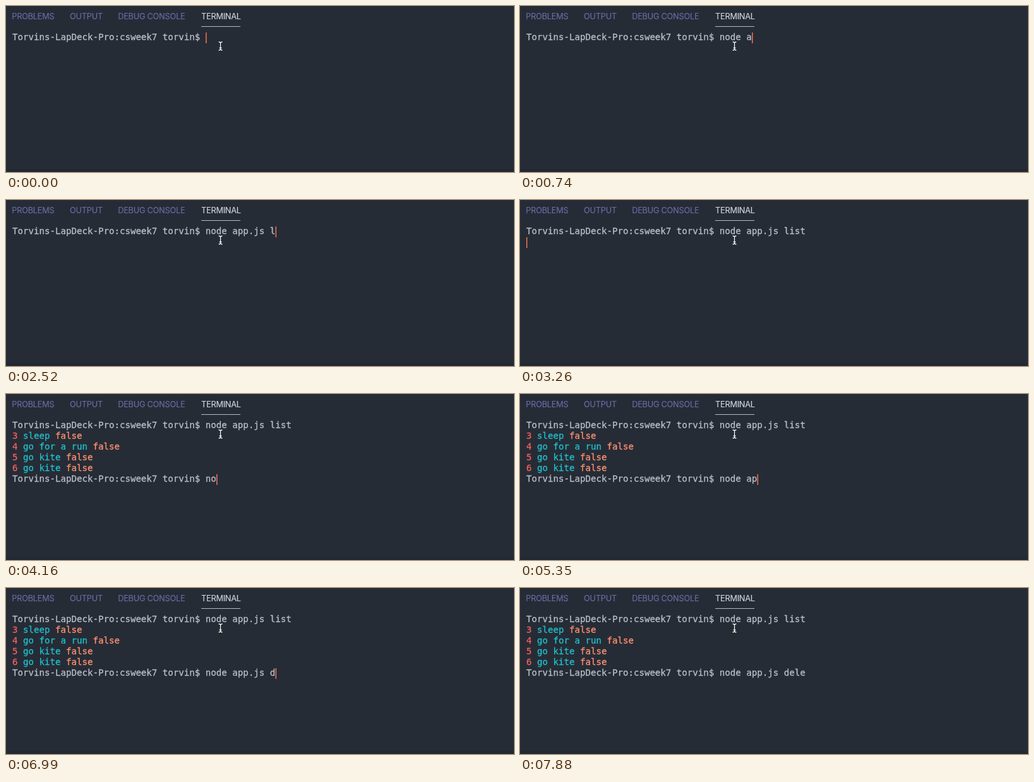
These frames come from a looping animation (804x263 px, 8 s). An HTML page:

```html
<!DOCTYPE html>
<html lang="en">
<head>
<meta charset="utf-8">
<title>Terminal</title>
<style>
  html, body { margin: 0; height: 100%; overflow: hidden; background: #262c36; }
  svg { display: block; width: 804px; height: 263px; }
  text { white-space: pre; stroke-width: .3px; }
  #tabs { font: 12.7px Inter, sans-serif; letter-spacing: -.2px; fill: #6b6aa3; stroke: #6b6aa3; }
  #tabs text { stroke-width: .15px; }
  #tabs .active { fill: #d0d4dc; stroke: #d0d4dc; }
  #lines { font: 14.12px "DejaVu Sans Mono", monospace; fill: #b9bec8; stroke: #b9bec8; }
  .id { fill: #f4605c; stroke: #f4605c; }
  .task { fill: #1fc0cb; stroke: #1fc0cb; }
  .done { fill: #ff9170; stroke: #ff9170; }
</style>
</head>
<body>
<svg viewBox="0 0 804 263">
  <defs>
    <path id="beam" d="M337 57q2.5 0 2.5 2v9q0 2-2.5 2M342 57q-2.5 0-2.5 2M339.5 68q0 2 2.5 2M338 66.5h3"/>
  </defs>
  <rect y="258" width="804" height="5" fill="#232932"/>
  <g id="tabs">
    <text x="9.3" y="21">PROBLEMS</text>
    <text x="101" y="21">OUTPUT</text>
    <text x="177.2" y="21">DEBUG CONSOLE</text>
    <text x="309" y="21" class="active">TERMINAL</text>
  </g>
  <rect x="309" y="32" width="62" height="1" fill="#b4b9c2"/>
  <g id="lines"></g>
  <rect id="caret" width="1.5" height="17" fill="#f4724f"/>
  <g fill="none" stroke-linecap="round">
    <use href="#beam" stroke="#15191f" stroke-width="2.4"/>
    <use href="#beam" stroke="#fff" stroke-width="1.3"/>
  </g>
</svg>
<script>
const LOOP = 8000, TICK = 148.6, LEAD = 10;
const LEFT = 10, CHAR = 8.5, ROW = 17;
const PROMPT = "Torvins-LapDeck-Pro:csweek7 torvin$ ";

// Keystrokes per tick, "|" separates ticks; Enter is followed by the listing
const beats = ("|no||de|| a||||p|p||.||j|s| |l|i|s|t||\n|"
  + "||||n|o|d|e||| |a||p|p||.||j|s||| ||d|el|e||||").split("|");
const enterTick = beats.indexOf("\n"), listTick = enterTick + 1;
const blinkTick = beats.length - 1;
const todos = ["3 sleep", "4 go for a run", "5 go kite", "6 go kite"];

const lines = document.getElementById("lines");
const caret = document.getElementById("caret");

function addLine(row) {
  const line = document.createElementNS("http://www.w3.org/2000/svg", "text");
  line.setAttribute("x", LEFT);
  line.setAttribute("y", 54 + row * ROW);
  lines.append(line);
  return line;
}

const firstLine = addLine(0);
const todoLines = todos.map((todo, i) => {
  const line = addLine(i + 1);
  line.innerHTML = `<tspan class="id">${todo[0]}</tspan><tspan class="task">${todo.slice(1)}</tspan><tspan class="done"> false</tspan>`;
  return line;
});
const lastRow = todos.length + 1;
const secondLine = addLine(lastRow);

function draw(now) {
  const tick = Math.floor((now % LOOP + LEAD) / TICK);
  const [command, next] = beats.slice(0, tick + 1).join("").split("\n");
  const listed = tick >= listTick;
  firstLine.textContent = PROMPT + command;
  secondLine.textContent = listed ? PROMPT + next : "";
  for (const line of todoLines) line.style.display = listed ? "" : "none";

  const row = listed ? lastRow : tick >= enterTick ? 1 : 0;
  const column = row === 1 ? 0 : (listed ? secondLine : firstLine).textContent.length;
  caret.setAttribute("x", LEFT + column * CHAR);
  caret.setAttribute("y", 42 + row * ROW);
  caret.style.display = tick < blinkTick ? "" : "none";
  requestAnimationFrame(draw);
}
draw(performance.now());
</script>
</body>
</html>
```
